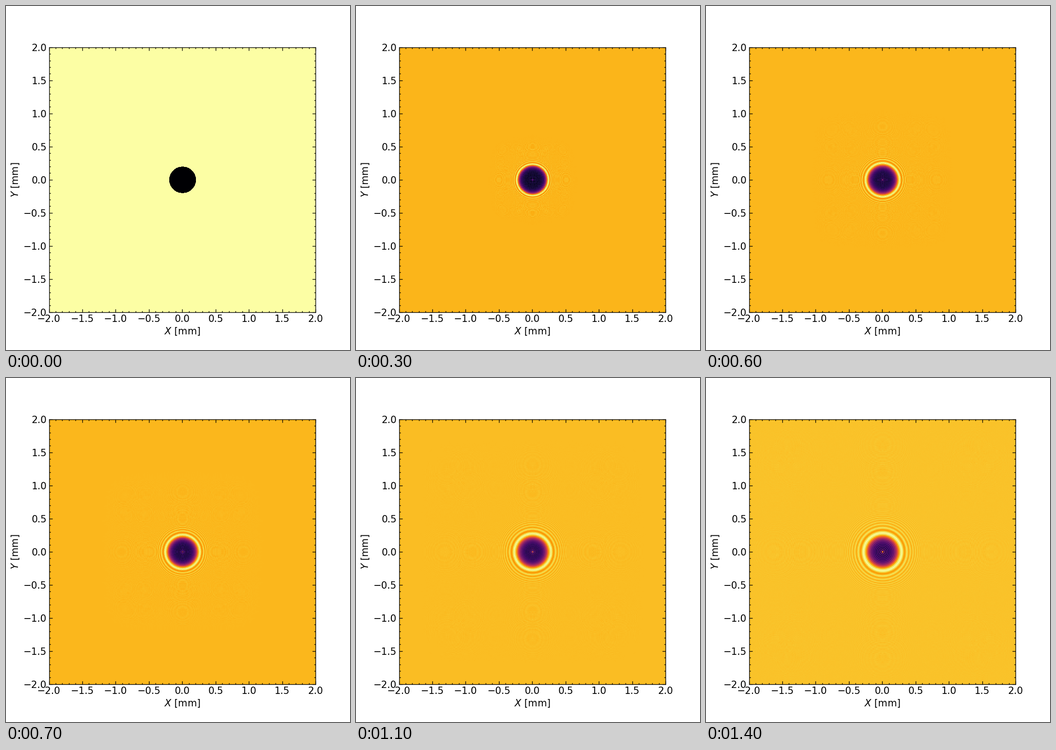
Recreate the animation shown at these times as a matplotlib script. Size 748 px wide and 748 px high, loop 1.5 s.

```python
import numpy as np
import matplotlib.pyplot as plt
from matplotlib.animation import FuncAnimation
from matplotlib.ticker import MultipleLocator

# Amplitude of a plane wave diffracted by an opaque disk (lengths in mm)
HALF = 2.0
N = 1500
RADIUS = 0.2
WAVELENGTH = 0.7e-3
Z_STEP = 1.0
FRAMES = 15

plt.rcParams.update({
    "font.family": "DejaVu Sans",
    "font.size": 15,
    "axes.linewidth": 1.0,
})

x = (np.arange(N) + 0.5) * 2 * HALF / N - HALF
mask = (x[:, None] ** 2 + x ** 2 > RADIUS ** 2).astype(float)
spectrum = np.fft.fft2(mask)
freq = np.fft.fftfreq(N, 2 * HALF / N)
sin2 = WAVELENGTH ** 2 * (freq[:, None] ** 2 + freq ** 2)
phase_rate = 2 * np.pi / WAVELENGTH * (np.sqrt(1 - sin2) - 1)


def amplitude(z):
    """Angular spectrum propagation over the distance z."""
    if z == 0:
        return mask.astype(np.float32)
    field = np.fft.ifft2(spectrum * np.exp(1j * phase_rate * z))
    return np.abs(field).astype(np.float32)


def peak(i):
    """Upper colour limit: the brightest fringe relative to the open field."""
    return 1.0 if i == 0 else 1 / (0.832 + 0.028 * (i / (FRAMES - 1)) ** 2)


fields = [amplitude(i * Z_STEP) for i in range(FRAMES)]

fig, ax = plt.subplots(figsize=(7.48, 7.48), dpi=100)
fig.subplots_adjust(left=0.125, right=0.9, bottom=0.11, top=0.88)
image = ax.imshow(fields[0], cmap="inferno", vmin=0, vmax=1, aspect="auto",
                  origin="lower", interpolation="nearest",
                  extent=(-HALF, HALF, -HALF, HALF))
ax.set_xlabel("$X$ [mm]")
ax.set_ylabel("$Y$ [mm]")
for axis in (ax.xaxis, ax.yaxis):
    axis.set_major_locator(MultipleLocator(0.5))
    axis.set_minor_locator(MultipleLocator(0.1))
ax.tick_params(which="both", direction="in", top=True, right=True, width=1.0)
ax.tick_params(which="major", length=5)
ax.tick_params(which="minor", length=2.5)


def update(i):
    image.set_data(fields[i])
    image.set_clim(0, peak(i))
    return (image,)


anim = FuncAnimation(fig, update, frames=FRAMES, interval=100,
                     repeat=True, repeat_delay=0)
plt.show()
```
